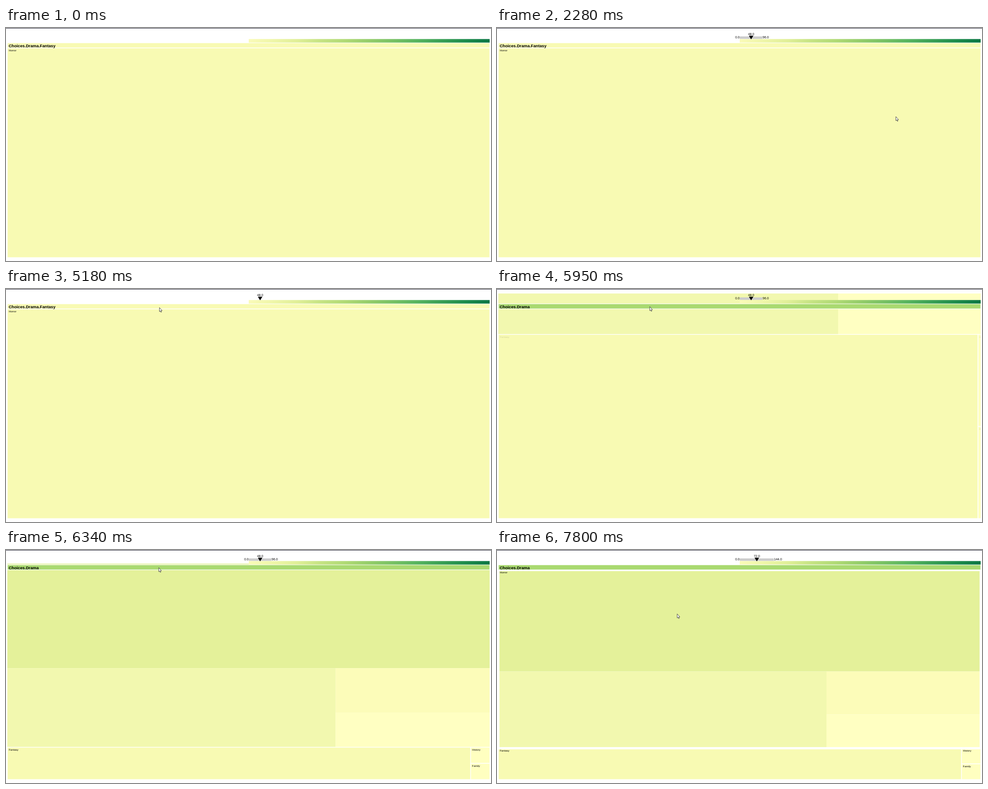
An HTML page with a canvas for the animation above (8000 ms loop, 1079 by 519 pixels).

```html
<!DOCTYPE html>
<html lang="en">
<head>
<meta charset="utf-8">
<title>Zoomable treemap</title>
<style>
html, body { margin: 0; width: 100%; height: 100%; overflow: hidden; background: #fff; }
canvas { display: block; }
</style>
</head>
<body>
<canvas id="stage" width="1079" height="519"></canvas>
<script>
const ctx = document.getElementById('stage').getContext('2d');
const LOOP = 8000, ZOOM_START = 5500;
const LEFT = 3, RIGHT = 1076.2, TOP = 44.6, BOTTOM = 511.3;
const SPLIT_X = 1033.4, SPLIT_Y = 441.5;
const FONT = '"Liberation Sans", Arial, sans-serif';
const FANTASY = '#f8fab3', DRAMA = '#a9d970';

// Cells of the outer view: left, top, right, bottom, colour, label
const horror = [LEFT, TOP, RIGHT, SPLIT_Y, '#e4f19a', 'Horror'];
const horrorParts = [
  [LEFT, TOP, RIGHT, 270.5, '#e4f19a'],
  [LEFT, 270.5, 733, SPLIT_Y, '#f2f8af'],
  [733, 270.5, RIGHT, 366.5, '#fcfcb9'],
  [733, 366.5, RIGHT, SPLIT_Y, '#ffffc2'],
];
const others = [
  [LEFT, SPLIT_Y, SPLIT_X, BOTTOM, FANTASY, 'Fantasy'],
  [SPLIT_X, SPLIT_Y, RIGHT, 476.4, '#ffffc0', 'History'],
  [SPLIT_X, 476.4, RIGHT, BOTTOM, '#ffffc0', 'Family'],
];

// Pointer path: time, x, y
const pointerPath = [
  [500, 953, 503], [720, 640, 270], [1050, 245, 90], [1290, 462, 111], [1370, 490, 167],
  [1960, 490, 167], [2280, 887, 197], [3000, 887, 197], [3290, 388, 168],
  [3470, 388, 168], [3610, 381, 162], [4340, 381, 162], [4460, 380, 163],
  [4560, 380, 163], [5180, 341, 41], [5400, 339.5, 39],
  [7040, 339.5, 39], [7800, 400.5, 142],
];
// Zoom clock: time, progress before easing
const zoomClock = [[ZOOM_START, 0], [5950, .328], [6270, .708], [6340, .889], [6500, 1]];

const lerp = (a, b, u) => a + (b - a) * u;
const easeInOut = u => u < .5 ? 4 * u ** 3 : 1 - 4 * (1 - u) ** 3;

function sample(keys, t) {
  if (t <= keys[0][0]) return keys[0].slice(1);
  const i = keys.findIndex(k => k[0] > t);
  if (i < 0) return keys[keys.length - 1].slice(1);
  const a = keys[i - 1], b = keys[i];
  const u = (t - a[0]) / (b[0] - a[0]);
  return a.slice(1).map((v, j) => lerp(v, b[j + 1], u));
}

function text(str, x, y, size, align = 'left', weight = '') {
  ctx.font = `${weight} ${size}px ${FONT}`;
  ctx.textAlign = align;
  ctx.fillStyle = '#000';
  ctx.fillText(str, x, y);
}

function box([x0, y0, x1, y1, fill], border = 0) {
  ctx.fillStyle = fill;
  ctx.fillRect(x0, y0, x1 - x0, y1 - y0);
  if (!border) return;
  ctx.strokeStyle = '#fff';
  ctx.lineWidth = border;
  ctx.strokeRect(x0, y0, x1 - x0, y1 - y0);
}

function label([x, y, , , , name], alpha = 1) {
  ctx.globalAlpha = alpha;
  text(name, x + 3.2, y + 7.6, 6);
  ctx.globalAlpha = 1;
}

// Place a cell between the view filled by Fantasy (p = 0) and the full view (p = 1)
function zoomed(cell, p) {
  const mapX = x => lerp(LEFT + (x - LEFT) / (SPLIT_X - LEFT) * (RIGHT - LEFT), x, p);
  const mapY = y => lerp(TOP + (y - SPLIT_Y) / (BOTTOM - SPLIT_Y) * (BOTTOM - TOP), y, p);
  const [x0, y0, x1, y1, ...rest] = cell;
  return [mapX(x0), mapY(y0), mapX(x1), mapY(y1), ...rest];
}

function drawOuterView(p, hover) {
  ctx.save();
  ctx.beginPath();
  ctx.rect(0, 10, RIGHT, 509);
  ctx.clip();
  for (const part of horrorParts) box(zoomed(part, p));
  for (const cell of others) {
    const c = zoomed(cell, p);
    box(c, 1.5);
    label(c, p);
  }
  if (hover) {
    ctx.strokeStyle = '#fff';
    ctx.lineWidth = 5;
    ctx.strokeRect(LEFT, TOP, RIGHT - LEFT, SPLIT_Y - TOP);
    label(horror);
  }
  ctx.restore();
}

const ramp = ctx.createLinearGradient(540, 0, 1076, 0);
['#fafbb8', '#eff6a9', '#e0ef98', '#c5e383', '#b0da75', '#94cd6a',
  '#77c164', '#56b45f', '#389f55', '#1d8c4c', '#0a7644']
  .forEach((c, i, all) => ramp.addColorStop(i / (all.length - 1), c));

function drawLegend(max, barShown) {
  box([540, 24.6, 1076, 32.5, ramp]);
  if (!max) return;
  const end = 540 + max * .528, mid = (540 + end) / 2;
  if (barShown) {
    box([540, 18.7, end, 24.2, '#ccc']);
    text('0.0', 539.7, 23.1, 7, 'right');
    text(max.toFixed(1), end + .3, 23.1, 7);
  }
  text((max / 2).toFixed(1), mid, 15.6, 7, 'center');
  ctx.beginPath();
  ctx.moveTo(mid - 5, 17.2);
  ctx.lineTo(mid + 5, 17.2);
  ctx.lineTo(mid, 25.3);
  ctx.fill();
}

const arrow = new Path2D('M.4 .4V9.4L2.3 7.7L3.7 10.8L5 10.2L3.7 7.2H6.4Z');
function drawPointer(x, y) {
  ctx.save();
  ctx.translate(x, y);
  ctx.fillStyle = '#fff';
  ctx.fill(arrow);
  ctx.strokeStyle = '#222';
  ctx.lineWidth = .8;
  ctx.stroke(arrow);
  ctx.restore();
}

function draw(t) {
  const outer = t >= ZOOM_START;
  const [x, y] = sample(pointerPath, t);
  const hover = t > 7000 && y > TOP;

  box([0, 0, 1079, 519, '#fff']);
  box([0, 0, 1079, 1, '#2b2b3b']);
  if (outer) {
    drawOuterView(easeInOut(sample(zoomClock, t)[0]), hover);
  } else {
    const cell = [LEFT, TOP, RIGHT, BOTTOM, FANTASY, 'Horror'];
    box(cell, 1.2);
    label(cell);
  }
  box([LEFT, 33, RIGHT, 44.2, outer ? DRAMA : FANTASY], 1.3);
  text(outer ? 'Choices.Drama' : 'Choices.Drama.Fantasy', 5.9, 43.1, 9.2, 'left', 'bold');
  drawLegend(t < 500 ? 0 : hover ? 144 : 96, t < 5100 || t >= 5400);
  if (t >= 500) drawPointer(x, y);
}

const start = performance.now();
function tick() {
  draw((performance.now() - start) % LOOP);
  requestAnimationFrame(tick);
}
tick();
</script>
</body>
</html>
```
